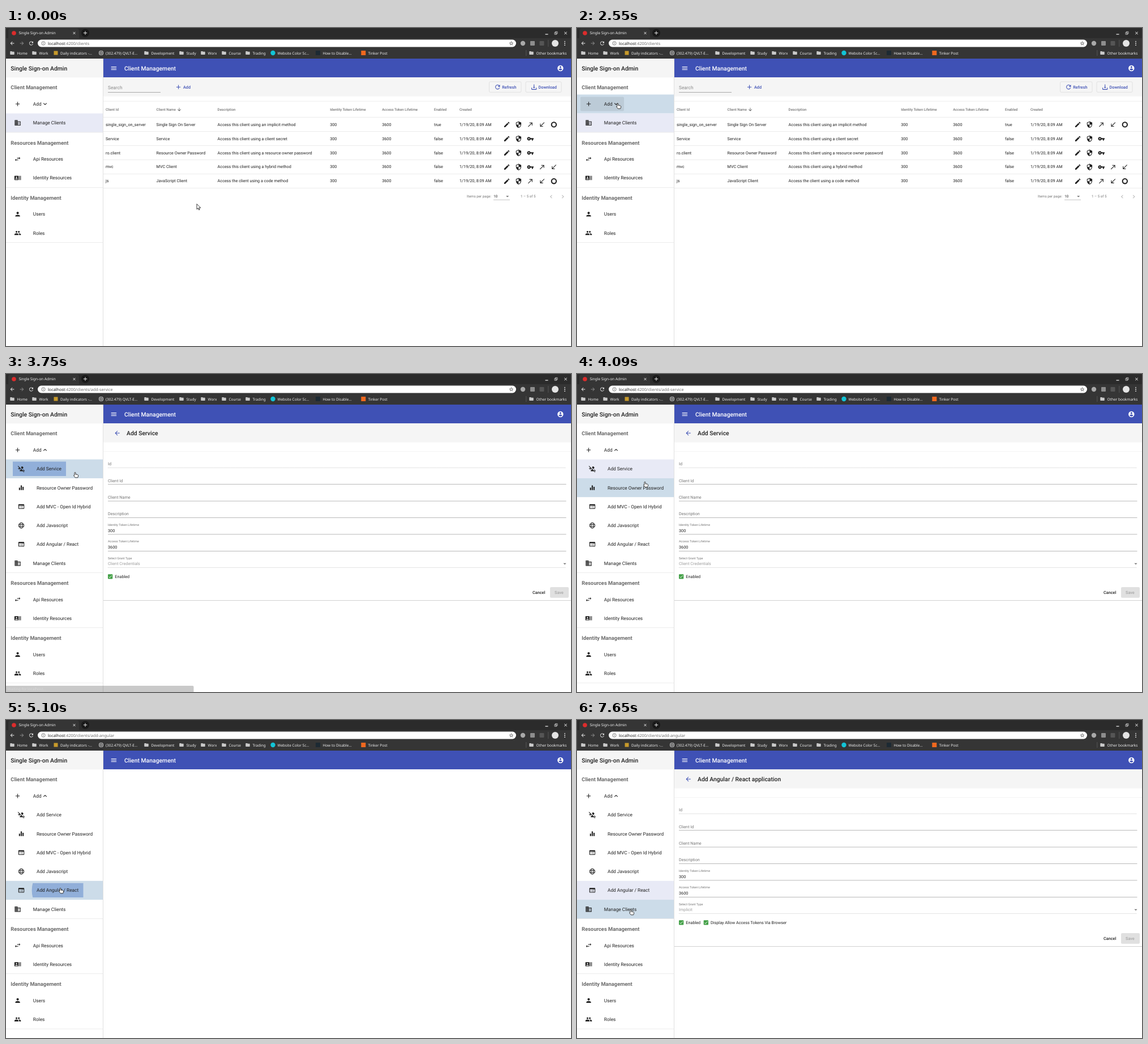
Recreate the animation shown at these times as an HTML page with a canvas. Size 998x561 px, loop 8 s.

```html
<!DOCTYPE html>
<html lang="en">
<head>
<meta charset="utf-8">
<title>Single Sign-on Admin</title>
<style>
html, body { margin: 0; width: 100%; height: 100%; overflow: hidden; background: #fff; }
canvas { display: block; width: 998px; height: 561px; }
</style>
</head>
<body>
<canvas id="stage" width="998" height="561"></canvas>
<script>
const ctx = document.getElementById('stage').getContext('2d');
const LOOP = 8000, ROW = 33.28, INK = '#212121', GRAY = '#757575', BLUE = '#3f51b5', LINE = '#e0e0e0';
const UI = '"Noto Sans", sans-serif', APP = 'Roboto, sans-serif';

// 24-unit icon outlines
const shapes = {
  menu: 'M3 18h18v-2H3zm0-5h18v-2H3zm0-7v2h18V6z',
  account: 'M12 2a10 10 0 1 0 0 20 10 10 0 1 0 0-20zm0 3a3 3 0 1 1 0 6 3 3 0 1 1 0-6zm0 14.2c-2.5 0-4.71-1.28-6-3.22.03-1.99 4-3.08 6-3.08s5.97 1.09 6 3.08c-1.29 1.94-3.5 3.22-6 3.22z',
  add: 'M19 13h-6v6h-2v-6H5v-2h6V5h2v6h6z',
  more: 'M16.59 8.59L12 13.17 7.41 8.59 6 10l6 6 6-6z',
  less: 'M12 8l-6 6 1.41 1.41L12 10.83l4.59 4.58L18 14z',
  business: 'M12 7V3H2v18h20V7zM6 19H4v-2h2zm0-4H4v-2h2zm0-4H4V9h2zm0-4H4V5h2zm4 12H8v-2h2zm0-4H8v-2h2zm0-4H8V9h2zm0-4H8V5h2zm10 12h-8v-2h2v-2h-2v-2h2v-2h-2V9h8zm-2-8h-2v2h2zm0 4h-2v2h2z',
  swap: 'M7 11l-4 4 4 4v-3h7v-2H7zM21 9l-4-4v3h-7v2h7v3z',
  actors: 'M21 5v14h2V5zm-4 14h2V5h-2zM14 5H2a1 1 0 0 0-1 1v12a1 1 0 0 0 1 1h12a1 1 0 0 0 1-1V6a1 1 0 0 0-1-1zM8 7.75a2.25 2.25 0 1 1 0 4.5 2.25 2.25 0 1 1 0-4.5zM12.5 17h-9v-.75c0-1.5 3-2.25 4.5-2.25s4.5.75 4.5 2.25z',
  person: 'M12 12a4 4 0 1 0 0-8 4 4 0 1 0 0 8zm0 2c-2.67 0-8 1.34-8 4v2h16v-2c0-2.66-5.33-4-8-4z',
  people: 'M16 11a3 3 0 1 0 0-6 3 3 0 1 0 0 6zm-8 0a3 3 0 1 0 0-6 3 3 0 1 0 0 6zm0 2c-2.33 0-7 1.17-7 3.5V19h14v-2.5c0-2.33-4.67-3.5-7-3.5zm8 0l-1 .05c1.2.84 2 1.97 2 3.45V19h6v-2.5c0-2.33-4.67-3.5-7-3.5z',
  personOff: 'M15 12a4 4 0 1 0-3.9-5.1l3.1 5zM23 20v-2c0-2.3-4.1-3.7-6.9-3.9L22 20zM11.4 14.5C9.2 15.1 7 16.3 7 18v2h9.9l4 4 1.3-1.3L1.3 1.8 0 3.1 4 7v3H1v2h3v3h2v-3h2.9zM6 10v-.9l.9.9z',
  bars: 'M10 20h4V4h-4zm-6 0h4v-8H4zM16 9v11h4V9z',
  web: 'M20 4H4a2 2 0 0 0-2 2v12a2 2 0 0 0 2 2h16a2 2 0 0 0 2-2V6a2 2 0 0 0-2-2zm-5 14H4v-4h11zm0-5H4V9h11zm5 5h-4V9h4z',
  edit: 'M3 17.25V21h3.75L17.81 9.94l-3.75-3.75zM20.71 7.04a1 1 0 0 0 0-1.41l-2.34-2.34a1 1 0 0 0-1.41 0l-1.83 1.83 3.75 3.75z',
  shield: 'M12 1L3 5v6c0 5.55 3.84 10.74 9 12 5.16-1.26 9-6.45 9-12V5zm0 11h7c-.53 4.12-3.28 7.79-7 8.94V12H5V6.3l7-3.11z',
  made: 'M9 5v2h6.59L4 18.59 5.41 20 17 8.41V15h2V5z',
  received: 'M20 5.41L18.59 4 7 15.59V9H5v10h10v-2H8.41z',
  key: 'M12.65 10a6 6 0 1 0 0 4H17v4h4v-4h2v-4zM7 14a2 2 0 1 1 0-4 2 2 0 1 1 0 4z',
  ring: 'M12 2a10 10 0 1 0 0 20 10 10 0 1 0 0-20zm0 4a6 6 0 1 1 0 12 6 6 0 1 1 0-12z',
  refresh: 'M17.65 6.35A8 8 0 1 0 19.73 14h-2.08A6 6 0 1 1 16.22 7.78L13 11h7V4z',
  download: 'M13 12h3l-4 4-4-4h3V3h2zM21 14v5a2 2 0 0 1-2 2H5a2 2 0 0 1-2-2v-5h2v5h14v-5z',
  back: 'M20 11H7.83l5.59-5.59L12 4l-8 8 8 8 1.41-1.41L7.83 13H20z',
  forward: 'M12 4l-1.41 1.41L16.17 11H4v2h12.17l-5.58 5.59L12 20l8-8z',
  down: 'M20 12l-1.41-1.41L13 16.17V4h-2v12.17l-5.58-5.59L4 12l8 8z',
  left: 'M15.41 7.41L14 6l-6 6 6 6 1.41-1.41L10.83 12z',
  right: 'M10 6L8.59 7.41 13.17 12l-4.58 4.59L10 18l6-6z',
  folder: 'M10 4H4a2 2 0 0 0-2 2v12a2 2 0 0 0 2 2h16a2 2 0 0 0 2-2V8a2 2 0 0 0-2-2h-8z',
  check: 'M9 16.17L4.83 12l-1.42 1.41L9 19 21 7l-1.41-1.41z',
  close: 'M19 6.4L17.6 5 12 10.6 6.4 5 5 6.4l5.6 5.6L5 17.6 6.4 19l5.6-5.6 5.6 5.6 1.4-1.4-5.6-5.6z',
  star: 'M22 9.24l-7.19-.62L12 2 9.19 8.63 2 9.24l5.46 4.73L5.82 21 12 17.27 18.18 21l-1.63-7.03zM12 15.4l-3.76 2.27 1-4.28-3.32-2.88 4.38-.38L12 6.1l1.71 4.04 4.38.38-3.32 2.88 1 4.28z',
  triangle: 'M7 10l5 5 5-5z'
};
const icons = Object.fromEntries(Object.entries(shapes).map(([k, d]) => [k, new Path2D(d)]));
const arrowCursor = new Path2D('M0 0V9.4L2.2 7.4 3.7 10.6 5.2 10 3.8 6.8H6.8Z');
const handCursor = new Path2D('M-1 1Q-1 0 0 0T1 1V3.6Q5 3.4 5.6 5V6.6L4.7 9.3H.3L-2.4 5.8Q-2.4 4.5-1 5.2Z');

function rect(x, y, w, h, color) { ctx.fillStyle = color; ctx.fillRect(x, y, w, h); }
function hline(x1, x2, y, color = LINE) { rect(x1, y, x2 - x1, .6, color); }
function disc(x, y, r, color) {
  ctx.fillStyle = color;
  ctx.beginPath(); ctx.arc(x, y, r, 0, 7); ctx.fill();
}
function box(x, y, w, h, r, fill, stroke) {
  ctx.beginPath(); ctx.roundRect(x, y, w, h, r);
  if (fill) { ctx.fillStyle = fill; ctx.fill(); }
  if (stroke) { ctx.strokeStyle = stroke; ctx.lineWidth = .6; ctx.stroke(); }
}
// y is the middle of the capitals
function text(str, x, y, size = 7.28, color = INK, weight = 400, family = APP) {
  ctx.font = `${weight} ${size}px ${family}`;
  ctx.fillStyle = color;
  ctx.fillText(str, x, y + size * .357);
}
function icon(name, x, y, color = INK, size = 12.48) {
  ctx.save();
  ctx.translate(x - size / 2, y - size / 2);
  ctx.scale(size / 24, size / 24);
  ctx.fillStyle = color;
  ctx.fill(icons[name], 'evenodd');
  ctx.restore();
}
function globe(x, y, r, color) {
  ctx.strokeStyle = color; ctx.lineWidth = 1;
  ctx.beginPath();
  ctx.arc(x, y, r, 0, 7);
  ctx.moveTo(x + r * .45, y); ctx.ellipse(x, y, r * .45, r, 0, 0, 7);
  for (const d of [-.36, .36]) { ctx.moveTo(x - r * .9, y + r * d); ctx.lineTo(x + r * .9, y + r * d); }
  ctx.stroke();
}

function browser(path) {
  const light = '#f1f1f1', ui = (s, x, y, c = light, size = 6.5) => text(s, x, y, size, c, 400, UI);
  rect(0, 0, 998, 54, '#353535');
  rect(0, 0, 998, 18, '#2b2b2b');
  box(4, 1, 125, 20, 4, '#353535');
  disc(14, 9, 3.8, '#dd2c2c');
  ui('Single Sign-on Admin', 22.5, 9);
  icon('close', 120.5, 9, light, 7.5);
  disc(140, 8.7, 7, '#191919');
  icon('add', 140, 8.7, light, 11);
  rect(952.5, 10.5, 5, 1.2, light);
  box(969, 7.8, 3.6, 3.6, 0, null, light);
  box(970.4, 6.4, 3.6, 3.6, 0, null, light);
  icon('close', 988.5, 9, light, 8.5);

  icon('back', 11, 27, light, 10);
  icon('forward', 28, 27, '#8b8b8b', 10);
  icon('refresh', 44.5, 27, light, 10.5);
  box(56, 20.5, 845, 13, 6.5, '#fff');
  ctx.strokeStyle = '#555'; ctx.lineWidth = .7;
  ctx.beginPath(); ctx.arc(66, 27, 3.2, 0, 7); ctx.stroke();
  rect(65.6, 26.4, .8, 2.2, '#555'); rect(65.6, 25, .8, .8, '#555');
  ui('localhost', 74, 27, '#222', 7.2);
  ui(path, 74 + ctx.measureText('localhost').width, 27, '#707070', 7.2);
  icon('star', 892.5, 27, '#444', 9);
  disc(913, 27, 4.2, '#a9a9a9');
  box(926, 23, 8, 8, 1, '#8d8d8d');
  box(942.5, 23, 8, 8, 1, '#555');
  rect(957.5, 21, .7, 12, '#666');
  disc(970, 27, 6, '#e4e4e4');
  for (const y of [23.8, 27, 30.2]) disc(987, y, .9, light);

  const folders = [['Home', 11], ['Work', 50], ['Development', 248], ['Study', 310], ['Worx', 348],
    ['Course', 385], ['Trading', 427], ['Other bookmarks', 928]];
  for (const [name, x] of folders) {
    icon('folder', x, 44, '#c9c9c9', 9);
    ui(name, x + 8.5, 44.2);
  }
  rect(84.5, 40.5, 7, 7, '#c79a2b');
  ui('Daily indicators -…', 96, 44.2);
  disc(168, 44, 4, light); globe(168, 44, 3, '#555');
  ui('(302.479) QVLT-E…', 176, 44.2);
  disc(471.5, 44, 4.2, '#12c4d6');
  ui('Website Color Sc…', 479.5, 44.2);
  rect(547, 40, 8, 8, '#1d2a33');
  ui('How to Disable…', 559.5, 44.2);
  rect(627.3, 40, 8, 8, '#f0681f');
  ui('Tinker Post', 639.5, 44.2);
  rect(918.5, 39, .7, 10, '#666');
}

const subItems = [['personOff', 'Add Service'], ['bars', 'Resource Owner Password'],
  ['web', 'Add MVC - Open Id Hybrid'], ['globe', 'Add Javascript'], ['web', 'Add Angular / React']];

function sidebar(open, active, pointer, t) {
  const shift = open ? ROW * 5 : 0;
  rect(0, 54, 171, 33.3, '#f5f5f5');
  text('Single Sign-on Admin', 8.3, 71, 10.4, INK, 500);
  const heading = (s, y) => text(s, 8.3, y, 9.36, '#6b6b6b', 700);
  const background = (label, y) => {
    const hover = pointer.x < 171 && Math.abs(pointer.y - y) < ROW / 2;
    if (hover || label === active) rect(0, y - ROW / 2, 171, ROW, hover ? '#ccdce9' : '#e8eaf6');
  };
  const item = (name, label, y) => {
    background(label, y);
    icon(name, 20.6, y);
    text(label, 47.8, y, 8.32);
  };
  heading('Client Management', 105);
  background('Add', 134);
  if (t > 2550 && t < 3060) box(6, 121.5, 77, 25, 2, 'rgba(0,0,0,.08)');
  icon('add', 20.6, 134);
  text('Add', 47.8, 134, 8.32);
  icon(open ? 'less' : 'more', 69, 134);
  if (open) subItems.forEach(([name, label], i) => {
    const y = 167.3 + i * ROW;
    background(label, y);
    if (i === 0) ripple(12, 106, y, 122, t - 3300, 420);
    if (i === 4) ripple(12, 136.5, y, 96.5, t - 4980, 420);
    if (name === 'globe') globe(27, y, 4.7, INK);
    else icon(name, 27, y);
    text(label, 54, y, 8.32);
  });
  item('business', 'Manage Clients', 167.3 + shift);
  hline(0, 171, 183.8 + shift);
  heading('Resources Management', 202.2 + shift);
  item('swap', 'Api Resources', 231.2 + shift);
  item('actors', 'Identity Resources', 264.5 + shift);
  hline(0, 171, 281 + shift);
  heading('Identity Management', 299.4 + shift);
  item('person', 'Users', 328.4 + shift);
  item('people', 'Roles', 361.7 + shift);
  hline(0, 171, 378.3 + shift);
  rect(171, 54, .8, 507, '#d9d9d9');
}

function ripple(x1, x2, y, cx, age, hold) {
  if (age < 0 || age > hold + 300) return;
  ctx.save();
  ctx.beginPath(); ctx.rect(x1, y - 12.7, x2 - x1, 25.4); ctx.clip();
  ctx.globalAlpha = Math.min(1, (hold + 300 - age) / 270);
  disc(cx, y, age * .42, 'rgba(36,91,187,.35)');
  ctx.restore();
}

function clientTable() {
  rect(172, 87, 826, 33.7, '#f5f5f5');
  text('Search', 180, 104.7, 8.32, '#8a8a8a');
  hline(180, 273, 113, '#777');
  icon('add', 304.6, 104.2, BLUE);
  text('Add', 313, 104, 7.28, BLUE, 500);
  box(853.5, 94.8, 56.5, 18.5, 2, null, '#d4d4d4');
  icon('refresh', 868.3, 104.2, BLUE);
  text('Refresh', 876.3, 104, 7.28, BLUE, 500);
  box(918, 94.8, 63, 18.5, 2, null, '#d4d4d4');
  icon('download', 932.7, 104.2, BLUE);
  text('Download', 940.5, 104, 7.28, BLUE, 500);
  hline(172, 998, 128.8);

  const columns = [176, 265.6, 373.6, 572.2, 664.2, 756, 801];
  ['Client Id', 'Client Name', 'Description', 'Identity Token Lifetime', 'Access Token Lifetime', 'Enabled', 'Created']
    .forEach((s, i) => text(s, columns[i], 143.8, 6.24, GRAY, 500));
  icon('down', 306, 143.8, '#555', 9);
  hline(172, 998, 157.3);

  const open = 'edit shield made received ring', secret = 'edit shield key';
  [['single_sign_on_server', 'Single Sign On Server', 'Access this client using an implicit method', true, open],
    ['Service', 'Service', 'Access this client using a client secret', false, secret],
    ['ro.client', 'Resource Owner Password', 'Access this client using a resource owner password', false, secret],
    ['mvc', 'MVC Client', 'Access this client using a hybrid method', false, secret + ' made received'],
    ['js', 'JavaScript Client', 'Access the client using a code method', false, open]
  ].forEach(([id, name, about, enabled, actions], i) => {
    const y = 170 + i * 24.96;
    [id, name, about, '300', '3600', String(enabled), '1/19/20, 8:09 AM'].forEach((s, c) => text(s, columns[c], y));
    actions.split(' ').forEach((a, k) => icon(a, 884.6 + k * 20.8, y + .4));
    hline(172, 998, y + 12.3);
  });

  text('Items per page:', 814, 297, 6.24, GRAY);
  text('10', 861.3, 297, 6.24);
  icon('triangle', 885.7, 297, GRAY);
  hline(861, 890, 302.8, '#999');
  text('1 – 5 of 5', 909, 297, 6.24, GRAY);
  icon('left', 963, 297.5, '#b5b5b5');
  icon('right', 983.5, 297.5, '#b5b5b5');
}

function clientForm(title, grant, extra) {
  rect(172, 87, 826, 33.7, '#f5f5f5');
  icon('back', 196.6, 104.3, BLUE);
  text(title, 213, 104.3, 10.4, INK, 500);
  hline(172, 998, 136.5, '#ededed');
  const underline = (y, dotted) => {
    if (!dotted) return hline(180, 989.5, y, '#8a8a8a');
    for (let x = 180; x < 989; x += 2.08) rect(x, y, 1.04, .6, '#a5a5a5');
  };
  ['Id', 'Client Id', 'Client Name', 'Description'].forEach((s, i) => {
    text(s, 180, 158.6 + i * 29.4, 7.28, GRAY);
    underline(165 + i * 29.4, i === 0);
  });
  [['Identity Token Lifetime', '300'], ['Access Token Lifetime', '3600'], ['Select Grant Type', grant]].forEach(([label, value], i) => {
    const y = 276 + i * 29.4, disabled = i === 2;
    text(label, 180, y - 10, 5.46, GRAY);
    text(value, 180, y, 7.28, disabled ? '#9e9e9e' : INK);
    underline(y + 6.6, disabled);
  });
  icon('triangle', 987, 334.8, GRAY);
  const checkbox = (x, label) => {
    box(x, 353.2, 8.3, 8.3, 1, '#43a047');
    icon('check', x + 4.15, 357.4, '#fff', 8);
    text(label, x + 12.3, 357.4);
  };
  checkbox(180, 'Enabled');
  if (extra) checkbox(223.7, extra);
  text('Cancel', 930, 385.4, 7.28, INK, 500);
  box(961, 376, 33, 18.7, 2, '#e0e0e0');
  text('Save', 969, 385.4, 7.28, '#a6a6a6', 500);
  hline(172, 998, 399, '#b5b5b5');
}

// time, x, y of the pointer tip
const track = [[650, 337, 310.4], [1110, 138, 151], [1400, 72, 133], [2610, 72, 133], [2930, 123.5, 166],
  [3060, 122, 173.5], [3800, 122, 173.5], [4020, 120, 189], [4090, 120, 190], [4520, 97, 286.5],
  [4720, 96, 296.5], [7280, 96, 296.5], [7650, 95, 334.5]];
function pointerAt(t) {
  const i = track.findIndex(k => k[0] > t);
  if (i === 0) return { x: track[0][1], y: track[0][2] };
  if (i < 0) return { x: track.at(-1)[1], y: track.at(-1)[2] };
  const [a, b] = [track[i - 1], track[i]], p = (t - a[0]) / (b[0] - a[0]);
  return { x: a[1] + (b[1] - a[1]) * p, y: a[2] + (b[2] - a[2]) * p };
}

function cursor({ x, y }) {
  const shape = x < 171 ? handCursor : arrowCursor;
  ctx.save();
  ctx.translate(x, y);
  ctx.fillStyle = '#fff'; ctx.strokeStyle = '#222'; ctx.lineWidth = .9; ctx.lineJoin = 'round';
  ctx.fill(shape); ctx.stroke(shape);
  ctx.restore();
}

function statusBar(t) {
  if (t < 3450 || t > 3820) return;
  ctx.globalAlpha = Math.min(1, (3820 - t) / 250);
  box(-2, 550, 333.5, 13, 2, '#3a3a3a');
  text('Waiting for localhost...', 2.5, 555.5, 6.5, '#fff', 400, UI);
  ctx.globalAlpha = 1;
}

function draw(now) {
  const t = now % LOOP;
  const page = t < 3400 ? 'clients' : t < 5040 ? 'service' : 'angular';
  ctx.textRendering = 'geometricPrecision';
  rect(0, 0, 998, 561, '#fff');
  browser(':4200/clients' + { clients: '', service: '/add-service', angular: '/add-angular' }[page]);
  rect(172, 54, 826, 33, BLUE);
  icon('menu', 190.4, 71, '#fff');
  text('Client Management', 209, 71, 10.4, '#fff', 500);
  icon('account', 979.3, 71, '#fff');

  if (page === 'clients') clientTable();
  else if (page === 'service' && t > 3600) clientForm('Add Service', 'Client Credentials');
  else if (t >= 6690) clientForm('Add Angular / React application', 'Implicit', 'Display Allow Access Tokens Via Browser');

  const active = { clients: 'Manage Clients', service: 'Add Service', angular: 'Add Angular / React' }[page];
  sidebar(t > 2610, active, pointerAt(t - 60), t);
  statusBar(t);
  cursor(pointerAt(t));
  requestAnimationFrame(draw);
}
requestAnimationFrame(draw);
</script>
</body>
</html>
```
